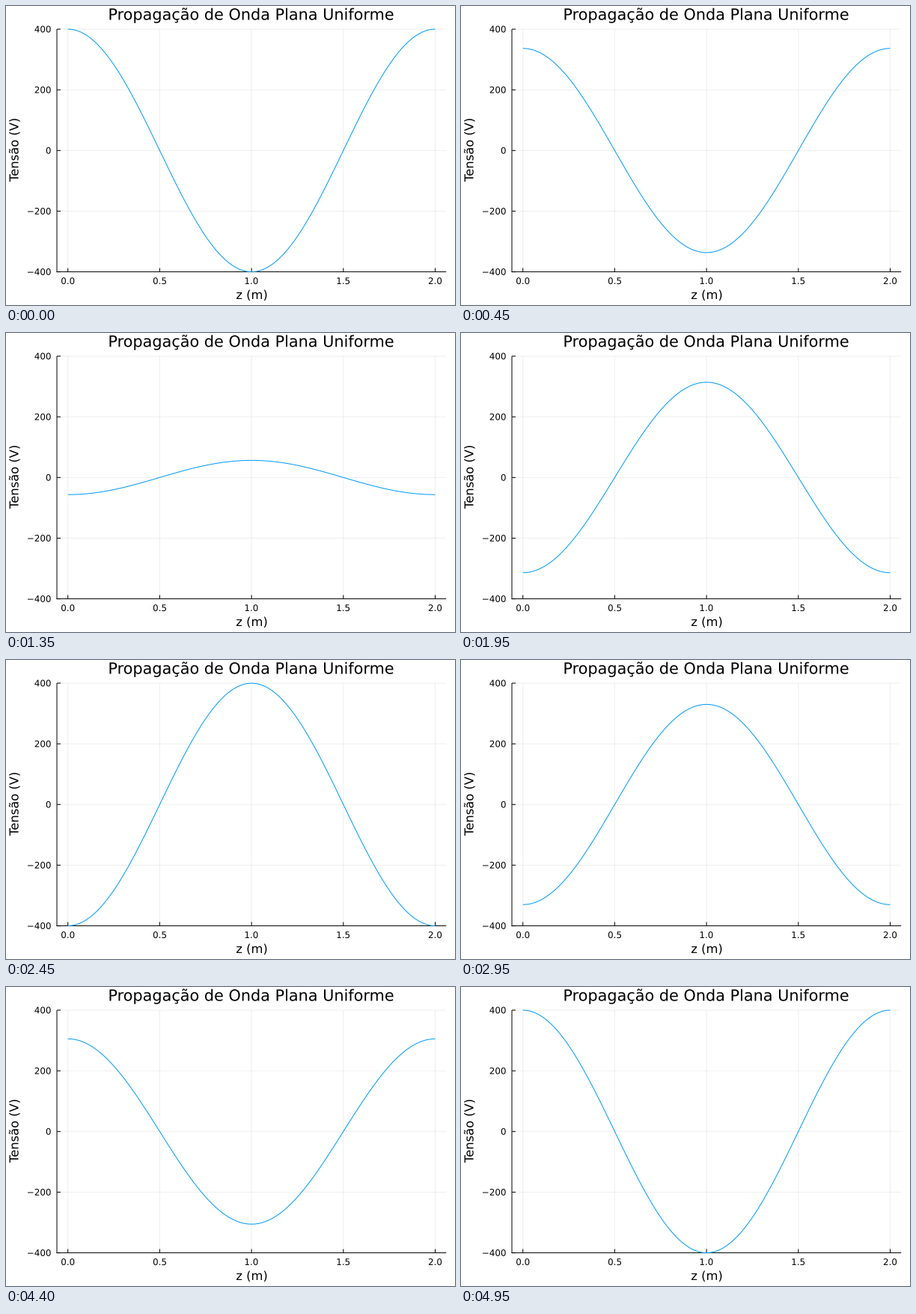
A matplotlib script that plays this animation: 600 px wide and 400 px high, repeating every 5000 ms.

```python
import matplotlib.pyplot as plt
import numpy as np
from matplotlib.animation import FuncAnimation
from matplotlib.patches import PathPatch
from matplotlib.textpath import TextPath
from matplotlib.transforms import Affine2D

W, H, DPI = 600, 400, 100
PT = 72 / DPI                      # points per pixel
FRAMES, INTERVAL = 100, 50
AMPLITUDE = 400
# The period is taken from c = 3e8 m/s, the wave runs at the exact speed.
SPEED = 2.99792458e8 / 3e8

LEFT, RIGHT, TOP, BOTTOM = 68.0, 588.2, 31.0, 355.6
X0, X_UNIT = 82.7, 245.4           # pixel of z = 0, pixels per metre
Y0, Y_UNIT = 193.3, 162.3 / 400    # pixel of 0 V, pixels per volt
TICK = 5

plt.rcParams.update({"font.family": "DejaVu Sans", "path.simplify": False})

fig = plt.figure(figsize=(W / DPI, H / DPI), dpi=DPI, facecolor="white")
ax = fig.add_axes([0, 0, 1, 1])
ax.set_xlim(0, W)
ax.set_ylim(H, 0)
ax.axis("off")


def px(z):
    return X0 + X_UNIT * z


def py(volts):
    return Y0 - Y_UNIT * volts


def stroke(xs, ys, color="black", alpha=1.0, z=2):
    return ax.plot(xs, ys, color=color, alpha=alpha, lw=PT, zorder=z,
                   snap=False, solid_capstyle="butt")[0]


def label(x, y, text, size, align=0.5, rotation=0):
    """Place outlined text on a baseline; align is 0 left to 1 right."""
    path = TextPath((0, 0), text, size=size)
    box = path.get_extents()
    place = (Affine2D().translate(-box.x0 - align * box.width, 0)
             .scale(1, -1).rotate_deg(-rotation).translate(x, y))
    ax.add_patch(PathPatch(place.transform_path(path), fc="black", lw=0,
                           snap=False, zorder=2))


for z in (0.0, 0.5, 1.0, 1.5, 2.0):
    x = px(z)
    stroke([x, x], [TOP, BOTTOM], alpha=0.065, z=1)
    stroke([x, x], [BOTTOM, BOTTOM - TICK])
    label(x, 372, f"{z:.1f}", 11.9)

for volts in range(-400, 401, 200):
    y = py(volts)
    stroke([LEFT, RIGHT], [y, y], alpha=0.065, z=1)
    stroke([LEFT, LEFT + TICK], [y, y])
    label(59.7, y + 4.3, str(volts).replace("-", "\u2212"), 11.9, align=1)

stroke([LEFT, LEFT], [TOP, BOTTOM + 0.5])
stroke([LEFT - 0.5, RIGHT], [BOTTOM, BOTTOM])

label(328, 18.5, "Propagação de Onda Plana Uniforme", 20.8)
label(328.2, 392, "z (m)", 16.35)
label(16.5, 193, "Tensão (V)", 16.35, rotation=90)

z_axis = np.linspace(0, 2, 201)
shape = AMPLITUDE * np.cos(np.pi * z_axis)
wave = stroke(px(z_axis), py(shape), color="#009AFA", z=3)


def update(i):
    phase = 2 * np.pi * SPEED * i / (FRAMES - 1)
    wave.set_ydata(py(shape * np.cos(phase)))
    return (wave,)


anim = FuncAnimation(fig, update, frames=FRAMES, interval=INTERVAL,
                     repeat=True, repeat_delay=0, blit=False)
plt.show()
```
